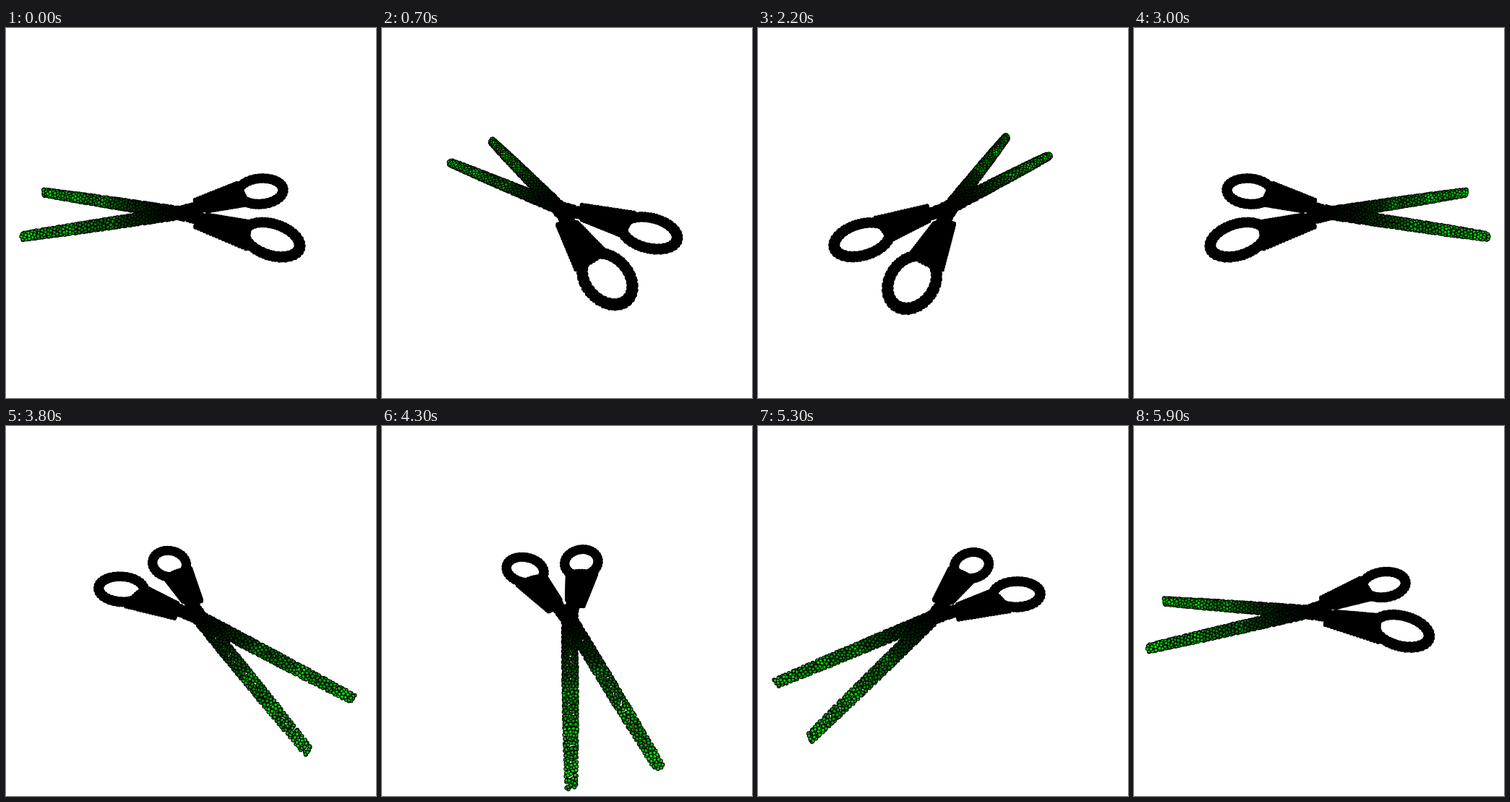
Write an HTML page with a canvas that moves like this. It is 512 by 512 pixels and loops after 6 s.

```html
<!DOCTYPE html>
<html>
<head>
<meta charset="utf-8">
<style>
  html, body { margin: 0; width: 100%; height: 100%; overflow: hidden; background: #fff; }
  canvas { display: block; width: 512px; height: 512px; }
</style>
</head>
<body>
<canvas id="stage" width="512" height="512"></canvas>
<script>
const ctx = document.getElementById('stage').getContext('2d');
const TAU = Math.PI * 2;
const LOOP = 6000, STEP = 100;
const DIST = 440, TILT = 46 * Math.PI / 180;
const DOT = 2.45, RIM = 1.1;
const sinT = Math.sin(TILT), cosT = Math.cos(TILT);
const dots = [];

let seed = 7;
function rnd() {
  seed = (seed * 16807) % 2147483647;
  return seed / 2147483647;
}
const jitter = a => (rnd() - 0.5) * a;

function add(x, y, z, green = 0) {
  dots.push({ x, y, z, color: `rgb(0,${Math.round(Math.max(0, Math.min(255, green)))},0)` });
}

// piecewise linear lookup in [[position, value], ...]
function lerp(stops, v) {
  for (let i = 1; i < stops.length; i++) {
    const [a, p] = stops[i - 1], [b, q] = stops[i];
    if (v <= b) return p + (q - p) * Math.max(0, (v - a) / (b - a));
  }
  return stops[stops.length - 1][1];
}

const WIDTH = [[-18, 7.2], [15, 9], [60, 8.5], [100, 8], [165, 6.6], [216, 4.5]];
const GREEN = [[5, 0], [45, 20], [80, 60], [120, 120], [160, 155], [215, 185]];

// tapered tube of staggered dots, dark at the pivot and green at the tip
function blade(side, spots) {
  const n = 8;
  let row = 0;
  for (let v = -18; v <= 217; v += 3.9, row++) {
    const w = lerp(WIDTH, v), h = Math.min(w, 4.8);
    const cx = (v < 17 ? 0.38 : 0.211) * (v - 17);
    for (let i = 0; i < n; i++) {
      const a = (i + (row % 2) / 2) / n * TAU + jitter(0.3);
      const x = cx + w * Math.cos(a), z = h * Math.sin(a);
      let g = lerp(GREEN, v);
      if (v > 60) for (const s of spots) g += 65 * Math.exp(-(((v - s) / 6) ** 2));
      add(side * x, v + jitter(2.4), z, g);
    }
  }
}

// finger loop: a tilted elliptic ring
function loop(side) {
  const dx = -0.43, dy = -0.903, n = 62, tube = 4.4;
  for (let k = 0; k < n; k++) {
    const t = k / n * TAU, c = Math.cos(t), s = Math.sin(t);
    for (let i = 0; i < 6; i++) {
      const a = (i + (k % 2) / 2) / 6 * TAU, r = tube * Math.cos(a);
      const p = (35.5 + r) * c, q = (26.8 + r) * s;
      add(side * (-46 + dx * p - dy * q), -103.5 + dy * p + dx * q, tube * Math.sin(a));
    }
  }
}

// flat plate joining the pivot to the loop
function plate(side) {
  const mix = (a, b, t) => a + (b - a) * t;
  for (let i = 0; i <= 16; i++) {
    for (let j = 0; j <= 10; j++) {
      const t = i / 16, s = j / 10;
      const x = mix(mix(-25, -5, s), mix(-61, -18, s), t);
      const y = mix(mix(-6, -23, s), mix(-69, -80, s), t);
      const h = 1.5 + 3.5 * Math.sin(s * Math.PI);
      add(side * x, y, h);
      add(side * x, y, -h);
    }
  }
}

blade(1, [126, 166, 204]);
blade(-1, [105, 160, 207]);
for (const side of [1, -1]) {
  loop(side);
  plate(side);
}

function draw(time) {
  const k = Math.floor((time % LOOP) / STEP);
  const turn = (90 - 360 * k * STEP / LOOP) * Math.PI / 180;
  const c = Math.cos(turn), s = Math.sin(turn);
  const seen = dots.map(d => {
    const x = d.x * c - d.y * s, u = d.x * s + d.y * c;
    const depth = DIST + u * cosT - d.z * sinT, m = DIST / depth;
    return { x: 256 + x * m, y: 256 - (u * sinT + d.z * cosT) * m, depth, color: d.color };
  }).sort((a, b) => b.depth - a.depth);

  ctx.fillStyle = '#fff';
  ctx.fillRect(0, 0, 512, 512);
  ctx.strokeStyle = '#000';
  ctx.lineWidth = RIM;
  for (const p of seen) {
    ctx.fillStyle = p.color;
    ctx.beginPath();
    ctx.arc(p.x, p.y, DOT, 0, TAU);
    ctx.fill();
    ctx.stroke();
  }
}

let start = null;
function tick(now) {
  if (start === null) start = now;
  draw(now - start);
  requestAnimationFrame(tick);
}
draw(0);
requestAnimationFrame(tick);
</script>
</body>
</html>
```
